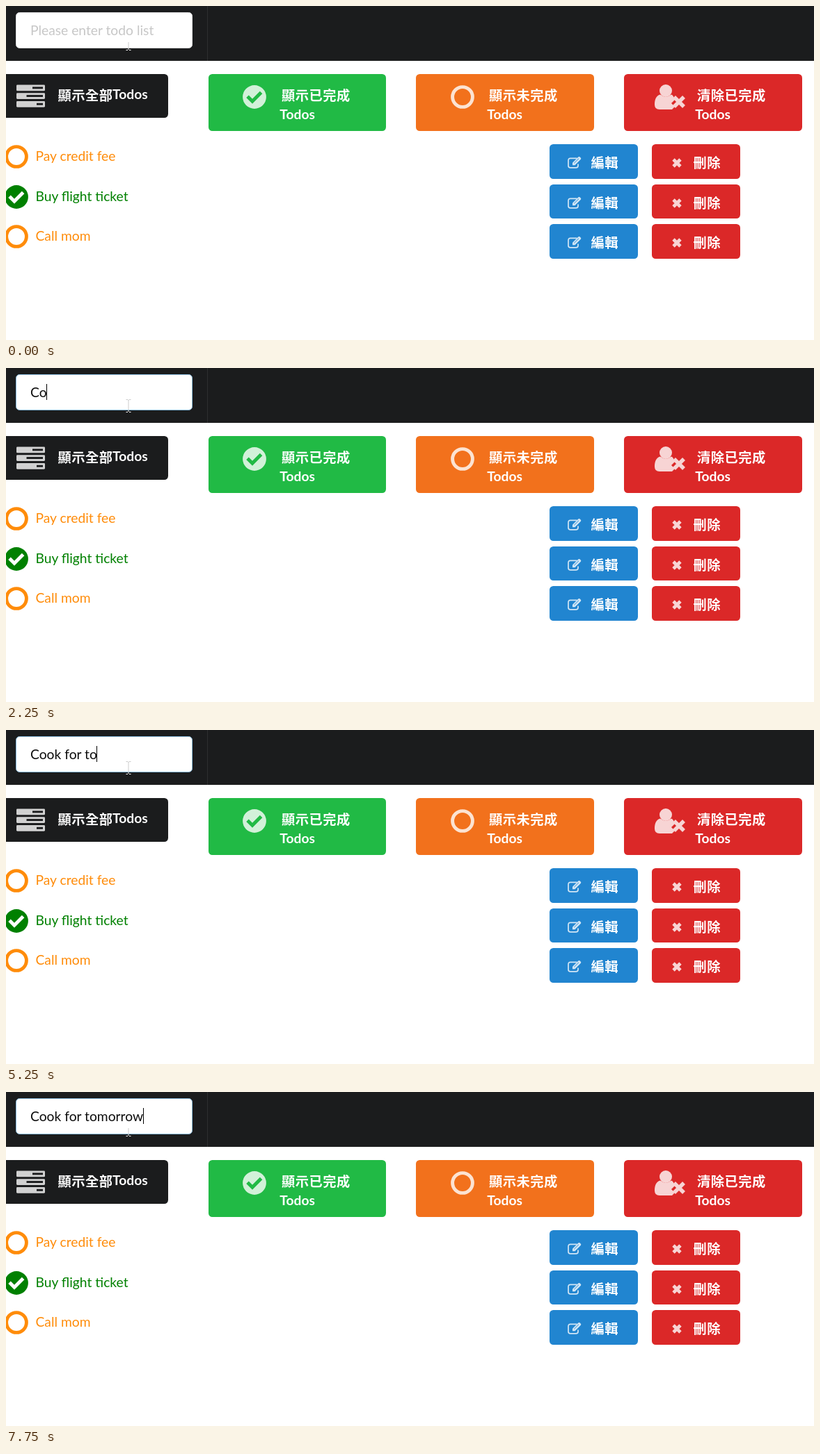
Write an HTML page that moves like this. It is 1161x481 px and loops after 8 s.

```html
<!DOCTYPE html>
<html lang="zh-TW">
<head>
<meta charset="utf-8">
<style>
  html, body { margin: 0; width: 100%; height: 100%; overflow: hidden; background: #fff; }
  svg { display: block; width: 1161px; height: 481px; }
  text { font: 19.25px Lato, "Noto Sans CJK TC", "Noto Sans CJK", sans-serif; white-space: pre; }
  .bold { font-weight: 700; fill: #fff; }
  .han { letter-spacing: .5px; }
  .icon { opacity: .8; }
</style>
</head>
<body>
<svg id="stage" viewBox="0 0 1161 481"></svg>
<script>
const stage = document.getElementById('stage');

const box = (x, y, w, h, fill, r = 5.5) =>
  `<rect x="${x}" y="${y}" width="${w}" height="${h}" rx="${r}" fill="${fill}"/>`;
const label = (x, y, str, cls = 'bold', fill = '#fff') =>
  `<text x="${x}" y="${y}" class="${cls}" fill="${fill}">${str}</text>`;
const line = (d, color, width, extra = '') =>
  `<path d="${d}" fill="none" stroke="${color}" stroke-width="${width}" ${extra}/>`;
const icon = (x, y, body) => `<g class="icon" transform="translate(${x} ${y})">${body}</g>`;

const ring = color => `<circle r="14.4" fill="none" stroke="${color}" stroke-width="4.9"/>`;
const tick = (disc, mark) => `<circle r="16.9" fill="${disc}"/>` +
  line('M-10-.8L-3 6.2L9.6-6.4', mark, 5);
const cross = (r, width) => line(`M${-r} ${-r}L${r} ${r}M${r} ${-r}L${-r} ${r}`, '#fff', width);
const tasks = [23, 14.5, 29].map((x, i) =>
  box(0, i * 11.7, 41, 8.8, '#fff', 1.4) +
  box(x, i * 11.7 + 2.9, 38 - x, 2.9, '#1b1c1d', 0)).join('');
const user = '<circle cx="16" cy="9" r="9" fill="#fff"/>' +
  '<path d="M8 14.5C2 16 0 22 0 29Q0 36 7 36H25L29 32L24 27L29 22Q27 15.5 24 14.5Q16 21 8 14.5Z" fill="#fff"/>' +
  `<g transform="translate(35 25)">${cross(7, 5.6)}</g>`;
const pencil = line('M13.5 2.8H4Q1 2.8 1 5.8V13.5Q1 16.4 4 16.4H12Q15 16.4 15 13.5V11', '#fff', 1.7) +
  '<path d="M7 12.7V9.2L15.5.8Q16.5 0 17.5.8L18.9 2.2Q19.7 3.2 18.9 4.2L10.5 12.7Z" fill="#fff"/>' +
  line('M9.3 9.8L16 3.2', '#2185d0', .9);

const filters = [
  [291, 255, '#21ba45', '顯示已完成', icon(357, 131, tick('#fff', '#21ba45'))],
  [589, 256, '#f2711c', '顯示未完成', icon(656, 131, ring('#fff'))],
  [888, 256, '#db2828', '清除已完成', icon(932, 113, user)],
].map(([x, w, color, str, mark]) =>
  box(x, 98, w, 82, color) + mark +
  label(x + 105, 135.5, str, 'bold han') + label(x + 102.3, 163, 'Todos')).join('');

const rows = [['Pay credit fee', 199, 50], ['Buy flight ticket', 257, 49], ['Call mom', 314, 50]]
  .map(([str, y, h], i) => {
    const done = i === 1, color = done ? '#008000' : '#ff8c0a';
    return `<g transform="translate(15 ${y + 18})">${done ? tick(color, '#fff') : ring(color)}</g>` +
      label(42.5, y + (i === 1 ? 23.6 : 23.8), str, '', color) +
      box(781, y, 127, h, '#2185d0') + icon(807, y + 17.5, pencil) +
      label(840.5, y + 34.3, '編輯', 'bold han') +
      box(928, y, 127, h, '#db2828') + icon(964, y + 27, cross(5, 4.8)) +
      label(987.5, y + 34.3, '刪除', 'bold han');
  }).join('');

stage.innerHTML =
  box(0, 0, 1161, 79, '#1b1c1d', 0) + box(289, 0, 1, 79, '#2d2e2f', 0) +
  '<rect id="field" x="14.5" y="9.5" width="253" height="51" rx="5" fill="#fff"/>' +
  '<text id="entry" x="35" y="42"></text>' +
  '<rect id="caret" y="23" width="1" height="23" fill="#000"/>' +
  line('M172.5 45.5H175L176 46.5L177 45.5H179.5M176 46V52', '#ccc', 1, 'id="beam"') +
  line('M176 52V61', '#ccc', 1) + line('M176 61V63M172.5 63.5H175M177 63.5H179.5', '#fff', 1) +
  box(-10, 98, 243, 63, '#1b1c1d') + icon(15, 113.5, tasks) +
  label(74.5, 135.5, '顯示全部', 'bold han') + label(153, 134, 'Todos') +
  filters + rows;

const [field, entry, caret, beam] =
  ['field', 'entry', 'caret', 'beam'].map(id => document.getElementById(id));

// [start ms, letters typed, caret shown]
const typed = 'Cook for tomorrow';
const steps = [
  [0, 0, 0], [500, 0, 1], [1000, 0, 0], [1500, 0, 1], [1750, 1, 1], [2250, 2, 1],
  [2500, 4, 1], [3000, 4, 0], [3500, 5, 1], [3750, 6, 1], [4000, 8, 1], [4500, 9, 1],
  [5000, 10, 1], [5250, 11, 1], [5500, 12, 1], [5750, 13, 1], [6000, 14, 1],
  [6250, 15, 1], [6500, 16, 1], [6750, 17, 1], [7250, 17, 0], [7750, 17, 1],
];

function draw(now) {
  const t = now % 8000;
  const [, count, shown] = steps.filter(s => s[0] <= t).pop();
  const focused = t >= 500;
  field.setAttribute('stroke', focused ? '#85b7d9' : '#dededf');
  entry.textContent = typed.slice(0, count);
  const width = count ? entry.getComputedTextLength() : 0;
  caret.setAttribute('x', Math.floor(35 + width));
  caret.setAttribute('visibility', shown ? 'visible' : 'hidden');
  if (!count) entry.textContent = 'Please enter todo list';
  entry.setAttribute('fill', count ? '#0d0d0d' : focused ? '#868686' : '#c7c7c7');
  beam.setAttribute('visibility', t >= 1750 && t < 6000 ? 'visible' : 'hidden');
  requestAnimationFrame(draw);
}
draw(0);
</script>
</body>
</html>
```
